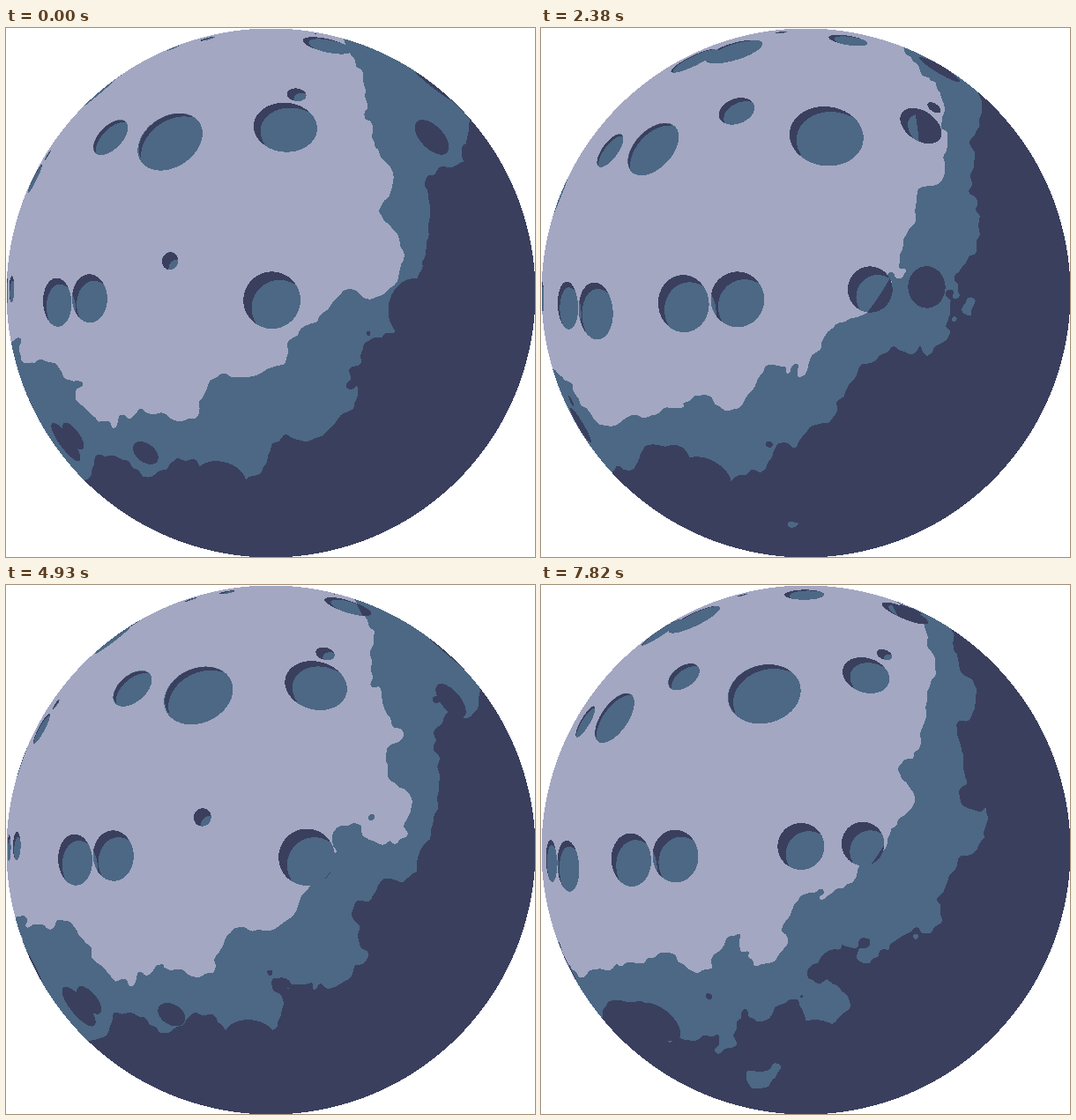
An HTML page with a canvas that plays this animation: 600x600 px, repeating every 7990 ms.

```html
<!DOCTYPE html>
<html lang="en">
<head>
<meta charset="utf-8">
<title>Turning moon</title>
<style>
  html, body { margin: 0; width: 100%; height: 100%; overflow: hidden; background: #fff; }
  canvas { display: block; width: 100vw; height: 100vh; }
</style>
</head>
<body>
<canvas id="moon" width="600" height="600"></canvas>
<script>
const SIZE = 600;
const STEP_MS = 170, STEPS = 47, TURN = 30;
const LIGHT = 0.25;                       // light sits at (LIGHT, LIGHT)
const GROUND = 8, CRATERS = 5;            // noise cells per turn
const EDGE_1 = 0.615, EDGE_2 = 0.729, CRATER_EDGE = 0.465;
const SOFT = 1 / SIZE;                    // middle of the blend zone at each edge
const SEED = 9.25;
// colours as ABGR words
const PALE = 0xffc2a7a3, BLUE = 0xff85684c, DARK = 0xff5e3f3a;

const { floor, sqrt, fround, hypot } = Math;
const ctx = document.getElementById('moon').getContext('2d');

// 8 x 8 lattice of seeded random values
const lattice = new Float64Array(64);
const KX = fround(12.9898), KY = fround(78.233);
for (let y = 0; y < 8; y++) {
  for (let x = 0; x < 8; x++) {
    const s = Math.sin(fround(fround(x * KX) + fround(y * KY))) * 15.5453 * SEED;
    lattice[y * 8 + x] = s - floor(s);
  }
}

const ease = t => t * t * (3 - 2 * t);

function noise(x, y) {
  const ix = floor(x), iy = floor(y);
  const x0 = ix & 7, x1 = (ix + 1) & 7;
  const y0 = (iy & 7) * 8, y1 = ((iy + 1) & 7) * 8;
  const u = ease(x - ix), v = ease(y - iy);
  const top = lattice[y0 + x0] * (1 - u) + lattice[y0 + x1] * u;
  const bottom = lattice[y1 + x0] * (1 - u) + lattice[y1 + x1] * u;
  return top + (bottom - top) * v;
}

function fbm(x, y) {
  let sum = 0;
  for (let amp = 0.5; amp > 0.05; amp /= 2) {
    sum += noise(x, y) * amp;
    x *= 2;
    y *= 2;
  }
  return sum;
}

// 0 inside the round spot of a cell, 1 outside
function spot(x, y) {
  const row = floor(y);
  x += row * 0.31;
  const col = floor(x);
  const h = lattice[(row % CRATERS) * 8 + col % CRATERS];
  const mid = 0.25 + h * 0.5, r = h * 0.25;
  const dx = x - col - mid, dy = y - row - mid;
  const t = (sqrt(dx * dx + dy * dy) - r * 0.9) / (r * 0.1);
  return t <= 0 ? 0 : t >= 1 ? 1 : ease(t);
}

// two layers of craters, the second one cell further
const crater = (x, y) => 1 - spot(x + 11, y + 11) * spot(x + 12, y + 12);

// the ground's warp does not move, so it is worked out once
const warp = new Float32Array(SIZE * SIZE);
for (let i = 0; i < warp.length; i++) {
  warp[i] = fbm(i % SIZE / SIZE, floor(i / SIZE) / SIZE);
}

const shade = (LIGHT - 0.5) * 0.03 * CRATERS;

function colourAt(u, v, bend, turn) {
  const light = hypot(u - LIGHT, v - LIGHT);

  const cx = u * 2 - 1, cy = v * 2 - 1;
  const bulge = 1 + sqrt(Math.max(0, 1 - cx * cx - cy * cy));
  const x = (cx / bulge * 0.5 + 0.5) * CRATERS + turn * CRATERS;
  const y = (cy / bulge * 0.5 + 0.5) * CRATERS;
  const hole = crater(x, y);
  if (hole >= 0.5) {
    if (light > CRATER_EDGE) return DARK;
    return crater(x + shade, y + shade) < hole - (0.5 - light) * 2 ? DARK : BLUE;
  }

  const d = light + 0.3 * fbm((u + turn) * GROUND + bend, v * GROUND + bend);
  return d > EDGE_2 + SOFT ? DARK : d > EDGE_1 + SOFT ? BLUE : PALE;
}

function render(turn) {
  const image = ctx.createImageData(SIZE, SIZE);
  const words = new Uint32Array(image.data.buffer);
  for (let py = 0, i = 0; py < SIZE; py++) {
    for (let px = 0; px < SIZE; px++, i++) {
      const u = px / SIZE, v = py / SIZE;
      if (hypot(u - 0.5, v - 0.5) <= 0.49999) {
        words[i] = colourAt(u, v, warp[i], turn);
      }
    }
  }
  return image;
}

const views = [];
let shown = -1;

function draw() {
  const step = floor(performance.now() / STEP_MS) % STEPS % TURN;
  if (step !== shown) {
    views[step] = views[step] || render(step / TURN);
    ctx.putImageData(views[step], 0, 0);
    shown = step;
  }
  requestAnimationFrame(draw);
}
draw();
</script>
</body>
</html>
```
